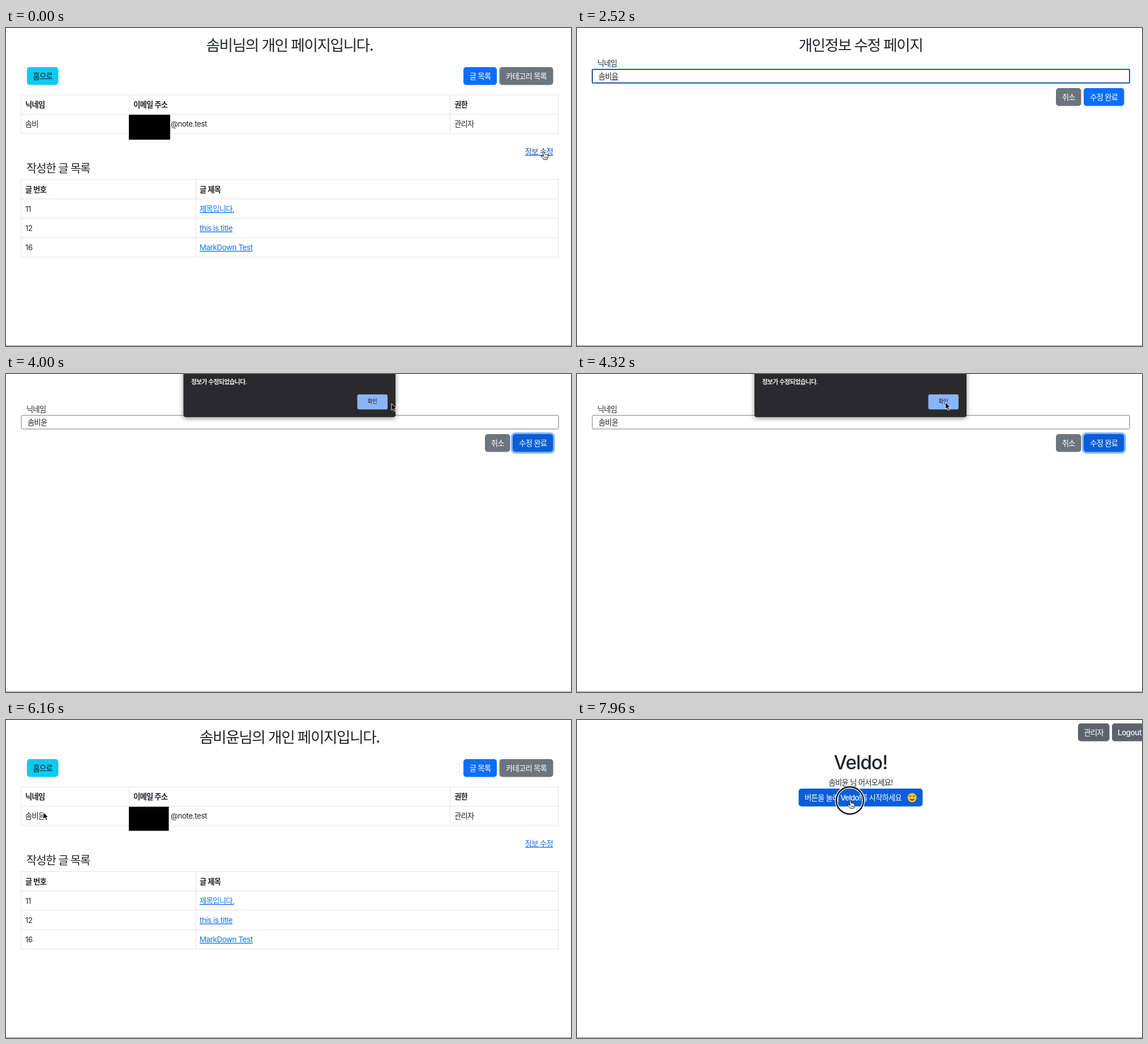
Recreate the animation shown at these times as an HTML page. Size 998 by 561 pixels, loop 8 s.

```html
<!DOCTYPE html>
<html lang="ko">
<head>
<meta charset="utf-8">
<style>
  html, body { margin: 0; width: 100%; height: 100%; overflow: hidden; background: #fff; }
  svg { display: block; width: 100%; height: 100%; }
  text {
    font-family: Inter, "Noto Sans CJK KR", "Noto Sans CJK", sans-serif;
    letter-spacing: -.055em; fill: #212529; white-space: pre;
  }
  .latin { letter-spacing: -.03em; }
  .link { fill: #0d6efd; text-decoration: underline; }
  .compose { text-decoration: underline; }
</style>
</head>
<body>
<svg id="stage" viewBox="0 0 998 561" lang="ko"></svg>
<script>
const LOOP = 8000, BASE = 13.35;
const NAME = '솜비', NEW_NAME = '솜비윤', SITE = 'Veldo!';
const BLUE = '#0d6efd', BLUE_DARK = '#0b5ed7', GRAY = '#6c757d', GRAY_DARK = '#5c636a';

// y is the middle of the line of text
const text = (x, y, str, { size = BASE, weight = 400, anchor = 'start', fill, cls = '', id = '' } = {}) =>
  `<text id="${id}" class="${cls}" x="${x}" y="${y + size * .36}" font-size="${size}" font-weight="${weight}"
    text-anchor="${anchor}" ${fill ? `style="fill:${fill}"` : ''}>${str}</text>`;
const rect = (x, y, w, h, fill, r = 0, extra = '') =>
  `<rect x="${x}" y="${y}" width="${w}" height="${h}" rx="${r}" fill="${fill}" ${extra}/>`;
const group = (id, ...parts) => `<g id="${id}">${parts.join('')}</g>`;
const title = str => text(501, 30, str, { size: 26.7, weight: 500, anchor: 'middle' });
const button = (x, y, w, label, fill, color = '#fff', id = '') =>
  rect(x, y, w, 31.5, fill, 5, `id="${id}"`) +
  text(x + w / 2, y + 15.7, label, { weight: 500, anchor: 'middle', fill: color });

// Table grid: outer frame, one inner column line, row lines
const grid = (rows, columns) => `<path fill="none" stroke="#dee2e6" d="${
  rows.map(y => `M26.5 ${y}H976`).join('')}${
  [26.5, ...columns, 975.5].map(x => `M${x} ${rows[0]}V${rows.at(-1)}`).join('')}"/>`;

const profile = (id, name, maskWidth, maskHeight) => group(id,
  title(`${name}님의 개인 페이지입니다.`),
  button(37, 69, 55.5, '홈으로', '#0dcaf0', '#111', id + 'Home'),
  button(808, 69, 59, '글 목록', BLUE),
  button(871.5, 69, 95, '카테고리 목록', GRAY),
  grid([118, 152, 186], [217.5, 784.5]),
  ...[[34, '닉네임'], [225, '이메일 주소'], [792, '권한']].map(([x, s]) => text(x, 135, s, { weight: 600 })),
  text(34, 169, name),
  text(355, 169, '@note.test', { anchor: 'end', cls: 'latin' }),
  text(792, 169, '관리자'),
  rect(217, 153, maskWidth, maskHeight, '#000'),
  text(966, 218, '정보 수정', { anchor: 'end', cls: 'link', id: id + 'Edit' }),
  text(36, 248, '작성한 글 목록', { size: 20, weight: 500 }),
  grid([267.5, 301.5, 335.5, 370, 404], [335.5]),
  text(34, 285, '글 번호', { weight: 600 }),
  text(342, 285, '글 제목', { weight: 600 }),
  ...[['11', '제목입니다.'], ['12', 'this is title'], ['16', 'MarkDown Test']].map(([no, s], i) =>
    text(34, 319 + i * 34.2, no, { cls: 'latin' }) +
    text(342, 319 + i * 34.2, s, { cls: i ? 'link latin' : 'link' })));

const editor = group('editor',
  title('개인정보 수정 페이지'),
  text(36, 62, '닉네임'),
  rect(27, 73, 949, 24, '#fff', 1.5, 'id="field"'),
  rect(38, 75, 23, 20, '#b3d7ff', 0, 'id="selection"'),
  text(38, 85, NAME, { id: 'typed' }),
  button(846, 106, 44.5, '취소', GRAY),
  rect(893.5, 104.5, 74.5, 34.5, 'none', 6, 'id="saveFocus" stroke="#86b6fe" stroke-width="3"'),
  button(895, 106, 71.5, '수정 완료', BLUE, '#fff', 'save'),
  group('suggestions',
    `<g style="filter:drop-shadow(0 1px 2px #0006)">${rect(108, 106, 60, 126, '#2b2b2d', 3)}
      <path fill="#2b2b2d" d="M118 106.500L126 99L134 106.500Z"/></g>`,
    ...[NAME, NAME + '1', NAME + '12', NEW_NAME].map((s, i) =>
      text(118, 124.500 + i * 29.9, s, { size: 10.7, weight: 600, fill: '#f1f1f1' }))),
  group('dialog',
    rect(313.5, -8, 374.5, 84, '#2a2a2c', 4, 'style="filter:drop-shadow(0 2px 4px #0007)"'),
    text(327, 14, '정보가 수정되었습니다.', { size: 10.8, weight: 600, fill: '#eee' }),
    rect(620.5, 36, 53.5, 26.5, '#8ab4f8', 3),
    text(647, 49, '확인', { size: 9.7, weight: 500, anchor: 'middle', fill: '#202124' })));

const home = group('home',
  button(885, 6, 55.5, '관리자', GRAY_DARK),
  rect(945, 6, 64, 31.5, GRAY_DARK, 5),
  text(955, 21.7, 'Logout', { weight: 500, fill: '#fff', cls: 'latin' }),
  text(501, 75, SITE, { size: 33.4, weight: 500, anchor: 'middle', cls: 'latin' }),
  text(501, 110.500, `${NEW_NAME} 님 어서오세요!`, { anchor: 'middle' }),
  rect(391.5, 121, 219, 31.5, BLUE, 5, 'id="start"'),
  text(402, 136.7, `버튼을 눌러 ${SITE}를 시작하세요`, { weight: 500, fill: '#fff' }),
  `<g transform="translate(592 137)"><circle r="8" fill="#fcc92f"/>
    <path d="M-5 1.500Q0 9.500 5 1.500Q0 3.500-5 1.500Z" fill="#7a4a12"/>
    <path d="M-5-2Q-3.200-4.500-1.500-2M1.500-2Q3.200-4.500 5-2" fill="none" stroke="#6b4010" stroke-width="1.300"/></g>`);

const pointer = group('pointer',
  group('ring',
    '<circle r="24" fill="none" stroke="#fff" stroke-width="5"/>',
    '<circle r="24" fill="none" stroke="#111" stroke-width="2.400"/>'),
  group('arrow', '<path d="M0 0V12L2.800 9.500L4.800 14L7 13L5 8.800H8.600Z" fill="#000" stroke="#fff" stroke-width=".9"/>'),
  group('beam', `<path id="stem" d="M-2.500-6Q0-6 0-4V4Q0 6-2.500 6M2.500-6Q0-6 0-4V4Q0 6 2.500 6M-1.500 2H1.500"
    fill="none" stroke="#333" stroke-width="1"/>`),
  group('hand', `<path d="M-1 .5Q.3-1 1.500.5L2.300 4.500Q3.800 3.500 4.600 5Q6 4.300 6.800 5.800Q8.400 5.500 8.500 7.500
    Q8.700 11 6.800 14H.8Q-.8 11-4 8.300Q-4 6.300-1.800 7.200L.5 9Z" fill="#fff" stroke="#111" stroke-width="1"/>
    <path d="M2.500 9V12M4.500 9V12M6.300 9V12" stroke="#111" stroke-width=".7"/>`));

document.getElementById('stage').innerHTML =
  profile('before', NAME, 73, 44) + editor + profile('after', NEW_NAME, 70.5, 42.5) + home +
  rect(0, 560, 998, 1, '#8c8c8c') + pointer;

const $ = id => document.getElementById(id);
const show = (id, on) => { $(id).style.display = on ? '' : 'none'; };
const paint = (id, attrs) => Object.entries(attrs).forEach(([k, v]) => $(id).setAttribute(k, v));

// time, x, y, cursor shape from then on
const path = [
  [0, 949, 218, 'hand'], [480, 949, 218, 'arrow'], [580, 949, 218, 'arrow'],
  [1000, 260, 92, 'beam'], [1120, 202, 87, 'beam'], [2400, 202, 87, 'none'],
  [2680, 202, 87, 'arrow'], [2880, 500, 185, 'arrow'], [3040, 500, 185, 'arrow'],
  [3200, 721, 205, 'arrow'], [3400, 925, 124, 'hand'], [3640, 925, 124, 'arrow'],
  [4000, 681, 52, 'arrow'], [4120, 652, 50, 'arrow'], [4480, 650, 50, 'arrow'],
  [5120, 346, 51, 'arrow'], [5400, 60, 260, 'arrow'], [5560, 25, 180, 'arrow'],
  [5720, 62, 181, 'arrow'], [5900, 26, 180, 'arrow'], [6100, 66, 180, 'arrow'],
  [6320, 66, 88, 'hand'], [6640, 66, 88, 'arrow'],
  [6930, 491, 111, 'beam'], [7320, 491, 111, 'beam'], [7520, 484, 136, 'hand'],
  [7720, 482, 142, 'hand'], [LOOP, 482, 142, 'hand'],
];
const clicks = [[360, 520], [1240, 1400], [3480, 3640], [4160, 4320], [6440, 6600], [7840, LOOP]];
const typing = [[0, ''], [2400, 'ㅇ'], [2520, '유'], [2640, '윤']];

function movePointer(t) {
  const i = path.findLastIndex(key => key[0] <= t);
  const [t0, x0, y0, shape] = path[i], [t1, x1, y1] = path[i + 1];
  const p = (t - t0) / (t1 - t0), ease = p * p * (3 - 2 * p);
  paint('pointer', { transform: `translate(${x0 + (x1 - x0) * ease} ${y0 + (y1 - y0) * ease})` });
  for (const kind of ['arrow', 'beam', 'hand']) show(kind, kind === shape);
  show('ring', clicks.some(([from, to]) => t >= from && t < to));
}

function draw(t) {
  const within = (from, to) => t >= from && t < to;
  show('before', t < 480);
  show('editor', within(480, 4480));
  show('after', within(4480, 6640));
  show('home', t >= 6640);

  $('beforeEdit').style.fill = '#0a58ca';
  paint('afterHome', { fill: within(6320, 6640) ? '#31d2f2' : '#0dcaf0' });
  paint('start', { fill: t >= 7480 ? BLUE_DARK : BLUE });

  const focused = within(1280, 3520);
  paint('field', { stroke: focused ? '#175aa6' : '#767676', 'stroke-width': focused ? 2 : 1 });
  show('selection', within(1400, 1680));
  show('suggestions', within(1320, 2400));
  show('dialog', within(3680, 4360));
  show('saveFocus', t >= 3520);
  paint('save', { fill: t >= 3360 ? BLUE_DARK : BLUE });

  const last = typing.findLast(step => step[0] <= t)[1];
  $('typed').innerHTML = NAME + `<tspan class="${focused ? 'compose' : ''}">${last}</tspan>`;
  movePointer(t);
}

function frame() {
  draw(performance.now() % LOOP);
  requestAnimationFrame(frame);
}
frame();
</script>
</body>
</html>
```
